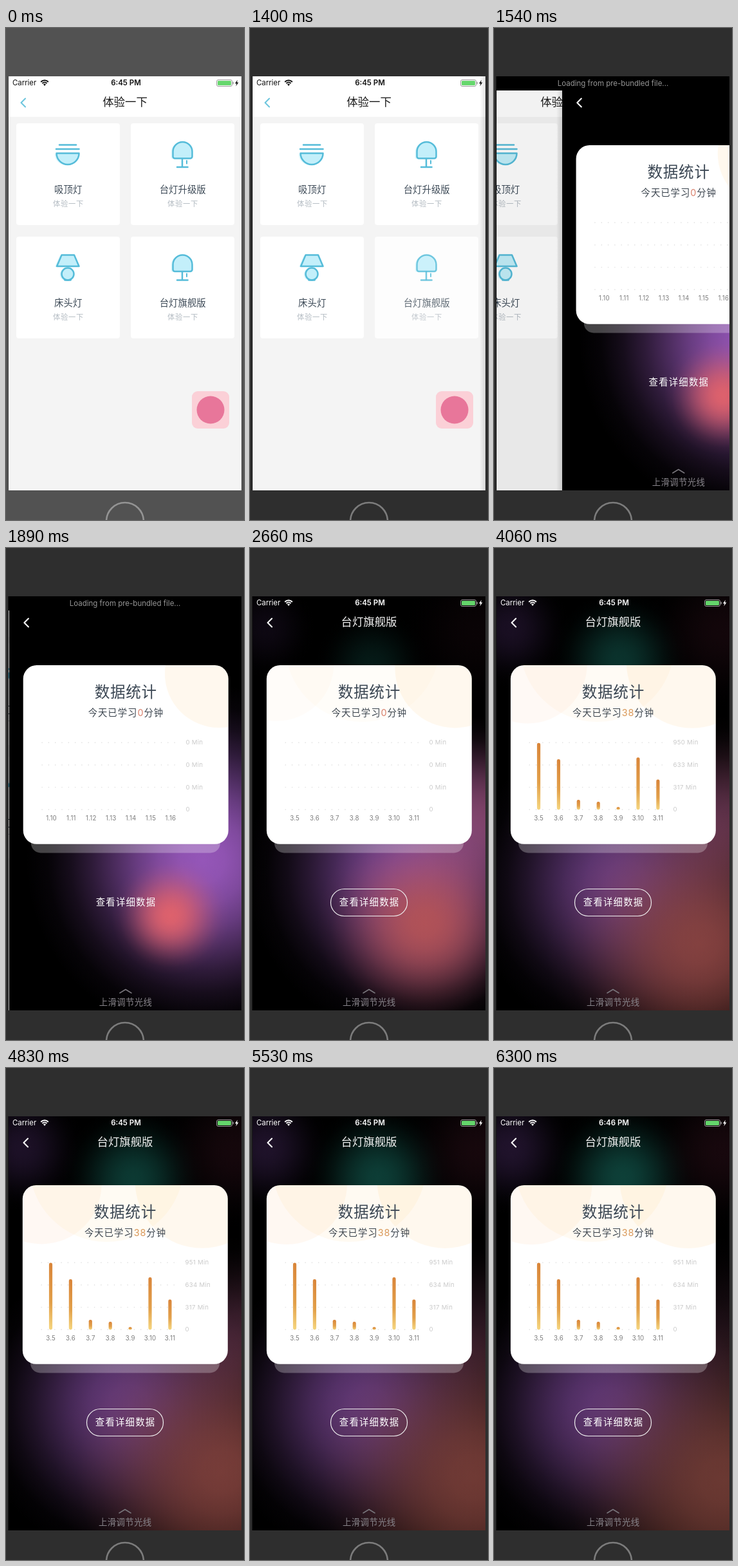
An HTML page with a canvas that plays this animation: 370x764 px, repeating every 6.37 s.

```html
<!DOCTYPE html>
<html lang="zh-CN">
<head>
<meta charset="utf-8">
<title>Lamp app</title>
<style>
html, body { margin: 0; width: 100%; height: 100%; overflow: hidden; background: #2e2e2e; }
canvas { position: absolute; left: 0; top: 0; width: 370px; height: 764px; }
</style>
</head>
<body>
<canvas id="stage"></canvas>
<script>
const LOOP = 6370, STEP = 70;
const X0 = 4, Y0 = 75, W = 362, H = 643, MID = 185;
const FOCUS = 1050, PUSH = 1400, PUSH_MS = 572, BANNER = 1470, DRIFT = 1890;
const READY = 2350, GROW = 3350, MINUTE = 5600;
const FONT = "Inter, 'Noto Sans CJK SC', 'Noto Sans CJK', sans-serif";

const canvas = document.getElementById('stage');
const dpr = window.devicePixelRatio || 1;
canvas.width = 370 * dpr;
canvas.height = 764 * dpr;
const c = canvas.getContext('2d');

const clamp = v => Math.max(0, Math.min(1, v));
const mix = (a, b, k) => a + (b - a) * k;
const smooth = v => { v = clamp(v); return v * v * (3 - 2 * v); };
const easeOut = v => 1 - Math.pow(1 - clamp(v), 3);

// Cubic bezier easing, solved by bisection
function bezier(x1, y1, x2, y2, x) {
  if (x <= 0) return 0;
  if (x >= 1) return 1;
  const at = (a, b, u) => 3 * (1 - u) * (1 - u) * u * a + 3 * (1 - u) * u * u * b + u * u * u;
  let lo = 0, hi = 1;
  for (let i = 0; i < 24; i++) {
    const m = (lo + hi) / 2;
    if (at(x1, x2, m) < x) lo = m; else hi = m;
  }
  return at(y1, y2, lo);
}

function text(s, x, y, size, color, { align = 'center', weight = 400, gap = 0 } = {}) {
  c.font = `${weight} ${size}px ${FONT}`;
  c.letterSpacing = gap + 'px';
  c.textAlign = align;
  c.textBaseline = 'middle';
  c.fillStyle = color;
  c.fillText(s, align === 'center' ? x + gap / 2 : x, y);
}

function box(x, y, w, h, r, color) {
  c.beginPath();
  c.roundRect(x, y, w, h, r);
  c.fillStyle = color;
  c.fill();
}

function line(points, color, width) {
  c.beginPath();
  points.forEach(([x, y]) => c.lineTo(x, y));
  c.strokeStyle = color;
  c.lineWidth = width;
  c.lineCap = c.lineJoin = 'round';
  c.stroke();
}

function disc(x, y, r, color) {
  c.beginPath();
  c.arc(x, y, r, 0, Math.PI * 2);
  c.fillStyle = color;
  c.fill();
}

function glow(rgb, x, y, r, alpha) {
  const g = c.createRadialGradient(x, y, 0, x, y, r);
  for (let i = 0; i <= 8; i++) {
    const fall = (1 + Math.cos(Math.PI * i / 8)) / 2;
    g.addColorStop(i / 8, `rgba(${rgb},${alpha * fall})`);
  }
  c.fillStyle = g;
  c.fillRect(x - r, y - r, r * 2, r * 2);
}

// All lights settle together; k runs from 0 towards 1
const settle = t => 1 - Math.exp(-Math.max(0, t - DRIFT) / 1600);

function lights(k) {
  const late = k * k;
  const ember = [mix(224, 108, k), mix(98, 58, k), mix(108, 50, k)];
  glow('18,85,75', mix(188, 202, late), mix(192, 168, k), mix(70, 120, k), .8 * k);
  glow('62,36,84', 25, 125, mix(60, 105, k), .55 * k);
  glow('82,28,46', 355, 130, 120, .3 * k);
  glow('152,88,188', mix(305, 170, k), mix(485, 530, k), mix(275, 235, k), mix(.98, .6, k));
  glow('170,88,128', 368, 420, 160, 2.6 * k * (1 - k));
  glow(ember, mix(255, 370, late), mix(571, 650, late), mix(92, 290, k), mix(.98, .92, k));
}

function tints(k) {
  disc(mix(330, 300, k), mix(195, 172, k), mix(84, 108, k), 'rgba(250,175,70,.09)');
  disc(mix(30, 60, k), 180, mix(85, 95, k), `rgba(255,165,100,${.09 * k})`);
  disc(mix(190, 150, k), 150, 120, `rgba(250,185,80,${.08 * k})`);
}

function statusBar(t, color) {
  text('Carrier', 10, 85.5, 11.4, color, { align: 'left' });
  text(t < MINUTE ? '6:45 PM' : '6:46 PM', 186.5, 85.5, 11.5, color, { weight: 600 });
  c.strokeStyle = color;
  c.lineCap = 'butt';
  c.lineWidth = 2;
  for (const r of [5, 8.2]) {
    c.beginPath();
    c.arc(60, 89.5, r, -Math.PI * .75, -Math.PI * .25);
    c.stroke();
  }
  c.beginPath();
  c.moveTo(60, 90);
  c.arc(60, 89.5, 2.8, -Math.PI * .75, -Math.PI * .25);
  c.fillStyle = color;
  c.fill();
  c.beginPath();
  c.roundRect(327.5, 80.5, 24, 10, 2.5);
  c.strokeStyle = '#9a9a9a';
  c.lineWidth = 1;
  c.stroke();
  box(329, 82, 21, 7, 1.2, '#65d66c');
  box(352.6, 83.5, 1.4, 4, 1, '#9a9a9a');
  c.beginPath();
  [[359.8, 80.5], [356, 86.2], [358.4, 86.2], [357.4, 90.5], [361.4, 84.6], [359, 84.6]]
    .forEach(([x, y]) => c.lineTo(x, y));
  c.fillStyle = color;
  c.fill();
}

const EDGE = '#55bcd9', GLASS = '#c3effa', HALO = '#e2f8fd';

function shape(path) {
  c.save();
  c.translate(-3, 1);
  c.fillStyle = HALO;
  c.fill(path);
  c.restore();
  c.fillStyle = GLASS;
  c.fill(path);
  c.strokeStyle = EDGE;
  c.lineWidth = 2.5;
  c.lineJoin = 'round';
  c.stroke(path);
}

function ceilingLamp() {
  line([[83, 181.5], [109, 181.5]], EDGE, 2.5);
  line([[78, 188], [113.5, 188]], EDGE, 2.5);
  const bowl = new Path2D();
  bowl.arc(96, 194.5, 17.5, 0, Math.PI);
  bowl.closePath();
  shape(bowl);
}

function tableLamp() {
  const dome = new Path2D();
  dome.roundRect(259.5, 177, 30, 25.5, [15, 15, 3, 3]);
  shape(dome);
  line([[274, 203.5], [274, 215]], EDGE, 2.5);
  line([[266, 216], [282.5, 216]], EDGE, 2.5);
  line([[281, 206], [281, 210.5]], EDGE, 2);
}

function bedsideLamp() {
  const body = new Path2D(), shade = new Path2D();
  body.arc(96, 382, 9.5, 0, Math.PI * 2);
  shape(body);
  line([[91.5, 391.5], [100.5, 391.5]], EDGE, 2.5);
  [[86.5, 352.5], [106, 352.5], [113.5, 370], [79, 370]].forEach(([x, y]) => shade.lineTo(x, y));
  shade.closePath();
  shape(shade);
}

function tile(x, y, name, icon, dy = 0, alpha = 1) {
  c.save();
  c.globalAlpha = alpha;
  box(x, y, 161, 158, 4, '#fff');
  c.save();
  c.translate(0, dy);
  icon();
  c.restore();
  text(name, x + 80.7, y + 104, 14.4, '#3d4a57');
  text('体验一下', x + 80.7, y + 126, 11.3, '#b3bbc2', { gap: .7 });
  c.restore();
}

function backArrow(x, color) {
  line([[x + 6.5, 109.5], [x, 116], [x + 6.5, 122.5]], color, 2.1);
}

function listPage(t, showStatus) {
  c.fillStyle = '#f4f4f4';
  c.fillRect(X0, Y0, W, H);
  c.fillStyle = '#fff';
  c.fillRect(X0, Y0, W, 63);
  if (showStatus) statusBar(t, '#111');
  text('体验一下', MID, 115.5, 17.4, '#1c1c1c');
  backArrow(23.5, '#6cc5dd');
  const press = smooth((t - 1110) / 150) * (1 - smooth((t - 1290) / 190));
  tile(16, 148, '吸顶灯', ceilingLamp);
  tile(194, 148, '台灯升级版', tableLamp);
  tile(16, 324, '床头灯', bedsideLamp);
  tile(194, 324, '台灯旗舰版', tableLamp, 175.5, 1 - .5 * press);
  box(289, 564, 58, 58, 9, '#fbd0d7');
  disc(318, 593, 21.5, '#e8769a');
}

const MINUTES = [951, 718, 142, 114, 38, 745, 430], TODAY = 38;
const BASE = 406.5, TALL = 104;

function chart(t, grow) {
  for (let row = 0; row < 4; row++) {
    const y = 302 + row * 34.7;
    for (let x = 54.5; x < 263; x += 10.3) box(x, y - .5, 1.4, 1.2, .5, '#d6d6d6');
    const label = row === 3 ? '0' : Math.round((3 - row) * 317 * grow) + ' Min';
    text(label, 278.5, y + .3, 9.6, '#cacaca', { align: 'left', gap: .3 });
  }
  const peak = Math.max(...MINUTES);
  MINUTES.forEach((m, i) => {
    const x = 69.5 + i * 30.9, h = m / peak * TALL * grow;
    text(t < READY ? '1.' + (10 + i) : '3.' + (5 + i), x, 420.5, 9.7, '#7c7c7c', { gap: .2 });
    if (h < .5) return;
    const g = c.createLinearGradient(0, BASE - h, 0, BASE);
    g.addColorStop(0, '#d9853a');
    g.addColorStop(.6, '#e2a04a');
    g.addColorStop(1, '#f5d680');
    box(x - 2.6, BASE - h, 5.2, h, 2.4, g);
  });
}

function studyLine(grow) {
  const size = 14.4, gap = .95;
  const runs = [
    ['今天已学习', '#3d4650'],
    [String(Math.round(TODAY * grow)), grow > 0 ? '#d9985a' : '#d8806c'],
    ['分钟', '#3d4650']
  ];
  c.font = `400 ${size}px ${FONT}`;
  c.letterSpacing = gap + 'px';
  const widths = runs.map(([s]) => c.measureText(s).width);
  let x = MID - (widths.reduce((a, b) => a + b) - gap) / 2;
  runs.forEach(([s, color], i) => {
    text(s, x, 256.2, size, color, { align: 'left', gap });
    x += widths[i];
  });
}

function detailPage(t, showStatus) {
  const grow = easeOut((t - GROW) / 800), k = settle(t);
  c.save();
  c.beginPath();
  c.rect(X0, Y0, W, H);
  c.clip();
  c.fillStyle = '#000';
  c.fillRect(X0, Y0, W, H);
  lights(k);

  box(38, 440, 294, 33.5, 15, 'rgba(255,255,255,.26)');
  c.save();
  c.beginPath();
  c.roundRect(25.8, 182, 319, 277.8, 21);
  c.fillStyle = '#fff';
  c.fill();
  c.clip();
  tints(k);
  c.restore();

  text('数据统计', MID, 225.3, 23.6, '#3a4653', { gap: .7 });
  studyLine(grow);
  chart(t, grow);

  if (t >= READY) {
    text('台灯旗舰版', MID, 116, 17.4, '#f2f2f2');
    c.beginPath();
    c.roundRect(125.5, 529.5, 119, 42, 21);
    c.strokeStyle = '#f0f0f0';
    c.lineWidth = 1.2;
    c.stroke();
  }
  text('查看详细数据', MID, 550.7, 14.4, '#fff', { gap: 1.2 });
  backArrow(27.5, '#fff');
  line([[176, 691], [185, 685.5], [194, 691]], '#77747a', 1.6);
  text('上滑调节光线', MID, 706, 13.4, '#88858b', { gap: .35 });
  if (showStatus) statusBar(t, '#fff');
  c.restore();
}

function phone(active) {
  c.fillStyle = active ? '#2e2e2e' : '#525252';
  c.fillRect(0, 0, 370, 764);
  c.beginPath();
  c.arc(185, 766, 29, 0, Math.PI * 2);
  c.strokeStyle = active ? '#7c7c7c' : '#949494';
  c.lineWidth = 2.6;
  c.stroke();
  c.fillStyle = active ? '#151515' : '#444';
  c.fillRect(X0 - 1, Y0, 1, H);
}

function render(t) {
  c.setTransform(dpr, 0, 0, dpr, 0, 0);
  phone(t >= FOCUS);
  const p = bezier(.2833, .99, .31833, .99, (t - PUSH) / PUSH_MS);
  const banner = t >= BANNER && t < READY;
  const left = X0 + W * (1 - p);

  c.save();
  c.beginPath();
  c.rect(X0, Y0, W, H);
  c.clip();
  if (p < 1) {
    c.save();
    c.translate(-.3 * W * p, 0);
    listPage(t, !banner);
    c.restore();
    c.fillStyle = `rgba(0,0,0,${.07 * p})`;
    c.fillRect(X0, Y0, W, H);
  }
  if (t >= PUSH) {
    if (p < 1) {
      const g = c.createLinearGradient(left - 9, 0, left, 0);
      g.addColorStop(0, 'rgba(0,0,0,0)');
      g.addColorStop(1, 'rgba(0,0,0,.12)');
      c.fillStyle = g;
      c.fillRect(left - 9, Y0, 9, H);
    }
    c.save();
    c.translate(left - X0, 0);
    detailPage(t, t >= READY);
    c.restore();
  }
  if (banner) {
    c.fillStyle = '#000';
    c.fillRect(X0, Y0, W, 22);
    text('Loading from pre-bundled file...', MID, 87, 11.5, '#969696');
  }
  c.restore();
}

const start = performance.now();
function tick() {
  const t = (performance.now() - start) % LOOP;
  render(Math.floor(t / STEP) * STEP);
  requestAnimationFrame(tick);
}
tick();
</script>
</body>
</html>
```
